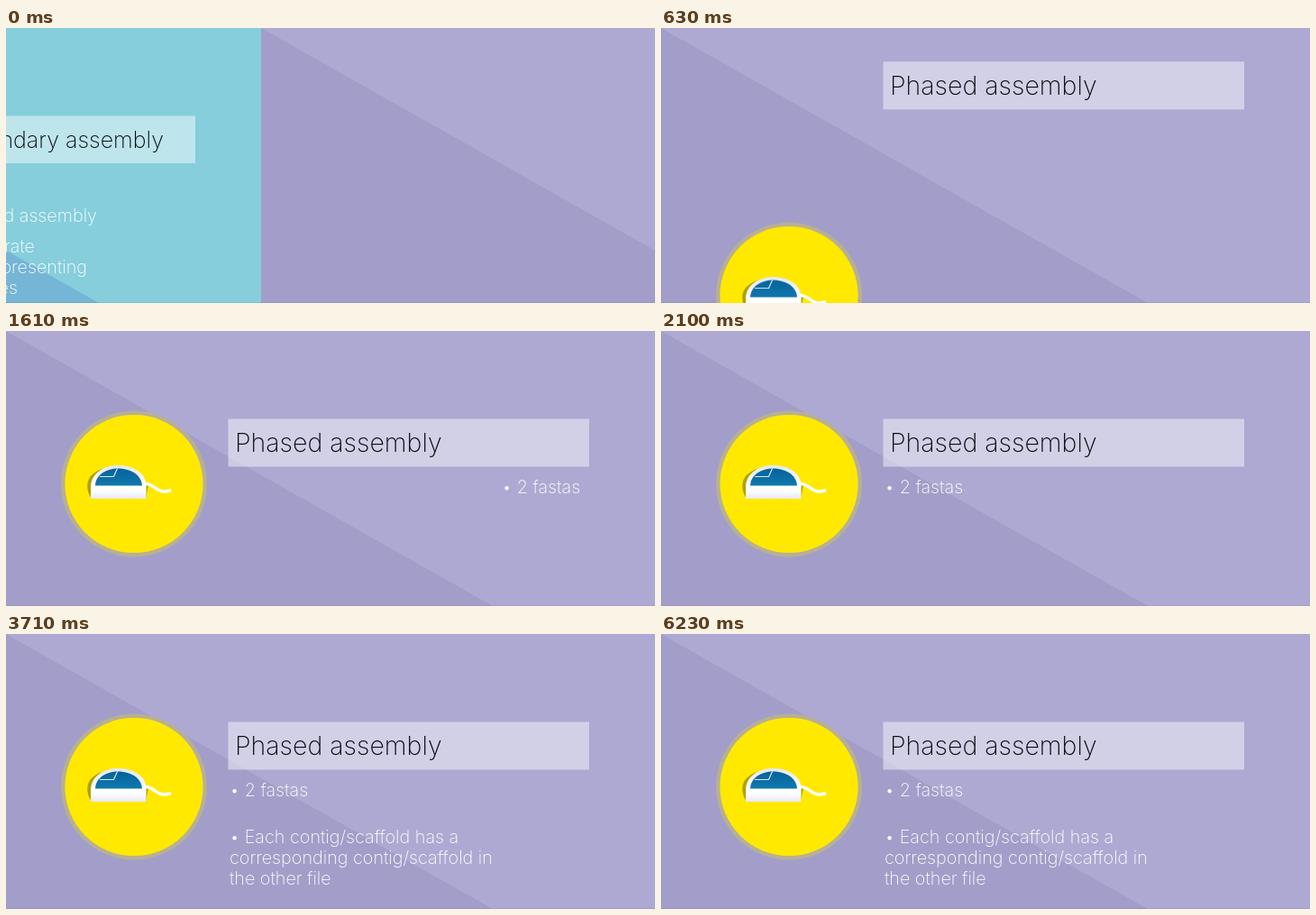
Write an HTML page that moves like this. It is 720 px wide and 305 px high and loops after 6300 ms.

```html
<!DOCTYPE html>
<html lang="en">
<head>
<meta charset="utf-8">
<title>Phased assembly</title>
<style>
  html, body { margin: 0; width: 100%; height: 100%; overflow: hidden; background: #aea9d2; }
  svg { display: block; width: 100vw; height: 100vh; }
  text { font-family: Inter, "Open Sans", sans-serif; }
  .head { font-size: 28.5px; font-weight: 250; fill: #0b0b10; }
  .small { font-size: 25px; }
  .body { font-size: 19.8px; font-weight: 200; fill: #fff; }
  .end { text-anchor: end; }

  .deck { animation: push 6.3s step-end infinite; }
  .show { animation: 6.3s step-end infinite; }
  .first { animation-name: show-first; }
  .second { animation-name: show-second; }
  .third { animation-name: show-third; }
  .fly { animation: fly 6.3s step-end var(--at) infinite; }
  .title { --dx: 0px; --dy: -97px; --at: 559ms; }
  .badge { --dx: 0px; --dy: 205px; --at: 559ms; }
  .files { --dx: 302px; --dy: 0px; --at: 1609ms; }
  .pairs { --dx: 236px; --dy: 0px; --at: 3219ms; }

  @keyframes push {
    0% { transform: translate(283px, 0); }
    1.11% { transform: translate(159px, 0); }
    2.22% { transform: translate(71px, 0); }
    3.33% { transform: translate(18px, 0); }
    4.44%, 100% { transform: translate(0, 0); }
  }
  @keyframes fly {
    0% { transform: translate(var(--dx), var(--dy)); }
    1.11% { transform: translate(calc(var(--dx) * .62), calc(var(--dy) * .62)); }
    2.22% { transform: translate(calc(var(--dx) * .37), calc(var(--dy) * .37)); }
    3.33% { transform: translate(calc(var(--dx) * .21), calc(var(--dy) * .21)); }
    4.44% { transform: translate(calc(var(--dx) * .11), calc(var(--dy) * .11)); }
    5.55% { transform: translate(calc(var(--dx) * .055), calc(var(--dy) * .055)); }
    6.66% { transform: translate(calc(var(--dx) * .02), calc(var(--dy) * .02)); }
    7.77%, 100% { transform: translate(0, 0); }
  }
  @keyframes show-first { 0% { opacity: 0; } 8.88%, 100% { opacity: 1; } }
  @keyframes show-second { 0% { opacity: 0; } 25.55%, 100% { opacity: 1; } }
  @keyframes show-third { 0% { opacity: 0; } 51.11%, 100% { opacity: 1; } }
</style>
</head>
<body>
<svg viewBox="0 0 720 305" preserveAspectRatio="none">
  <defs>
    <linearGradient id="shell" x1="0" y1="0" x2="0" y2="1">
      <stop offset="0" stop-color="#e4e8f1"/>
      <stop offset=".6" stop-color="#fff"/>
      <stop offset=".75" stop-color="#fff"/>
      <stop offset="1" stop-color="#e8e9f2"/>
    </linearGradient>
    <linearGradient id="glass" x1="0" y1="0" x2="0" y2="1">
      <stop offset="0" stop-color="#07639a"/>
      <stop offset="1" stop-color="#1078ae"/>
    </linearGradient>
  </defs>

  <g class="deck">
    <rect width="720" height="305" fill="#aea9d2"/>
    <path d="M0 0L540 305H0Z" fill="#a29ec9"/>

    <!-- outgoing slide -->
    <g transform="translate(-720 0)">
      <rect width="720" height="305" fill="#86cedc"/>
      <path d="M0 0L540 305H0Z" fill="#75b5d6"/>
      <rect x="246.5" y="97.5" width="400.5" height="52.5" fill="#fff" fill-opacity=".46"/>
      <text class="head small end" x="612" y="132.5">Secondary assembly</text>
      <g class="body end">
        <text x="538" y="215">• Collapsed assembly</text>
        <text x="469" y="249">• Separate</text>
        <text x="527" y="272">file representing</text>
        <text x="450" y="295">haplotypes</text>
      </g>
    </g>
  </g>
  <rect y="304" width="720" height="1" fill="#55506f" fill-opacity=".12"/>

  <g class="show first">
    <g class="fly title">
      <rect x="246.5" y="97.5" width="400.5" height="53" fill="#fff" fill-opacity=".45"/>
      <text class="head" x="254" y="134">Phased assembly</text>
    </g>
    <g class="fly badge">
      <circle cx="142" cy="169.5" r="81" fill="#b8b094"/>
      <circle cx="142" cy="169.5" r="76.6" fill="#ffe900"/>
      <path d="M95 186C89 178 88 165 96 159C104 152 115 150 124 151L158 171L155 186Z" fill="#b0a100"/>
      <path d="M154 169.5C163 168.5 167 178.5 175 178C179 178 181 177 183 176.5" fill="none" stroke="#fff" stroke-width="3.6"/>
      <path d="M94 186V172C95 157 109 149 124 149C141 149 155 157 155.5 171V186Z" fill="url(#shell)"/>
      <path d="M99 171.5C99.5 159 112 152.5 124 152.5C138 152.5 150 159 151 171.5Z" fill="url(#glass)"/>
      <path d="M104 161.5H119.5L123.5 152.5" fill="none" stroke="#d8e9f3" stroke-width="1.2"/>
    </g>
  </g>

  <g class="show second">
    <text class="body fly files" x="248" y="179.5">• 2 fastas</text>
  </g>

  <g class="show third">
    <g class="body fly pairs">
      <text x="248" y="232.2">• Each contig/scaffold has a</text>
      <text x="248" y="255">corresponding contig/scaffold in</text>
      <text x="248" y="277.6">the other file</text>
    </g>
  </g>
</svg>
</body>
</html>
```
